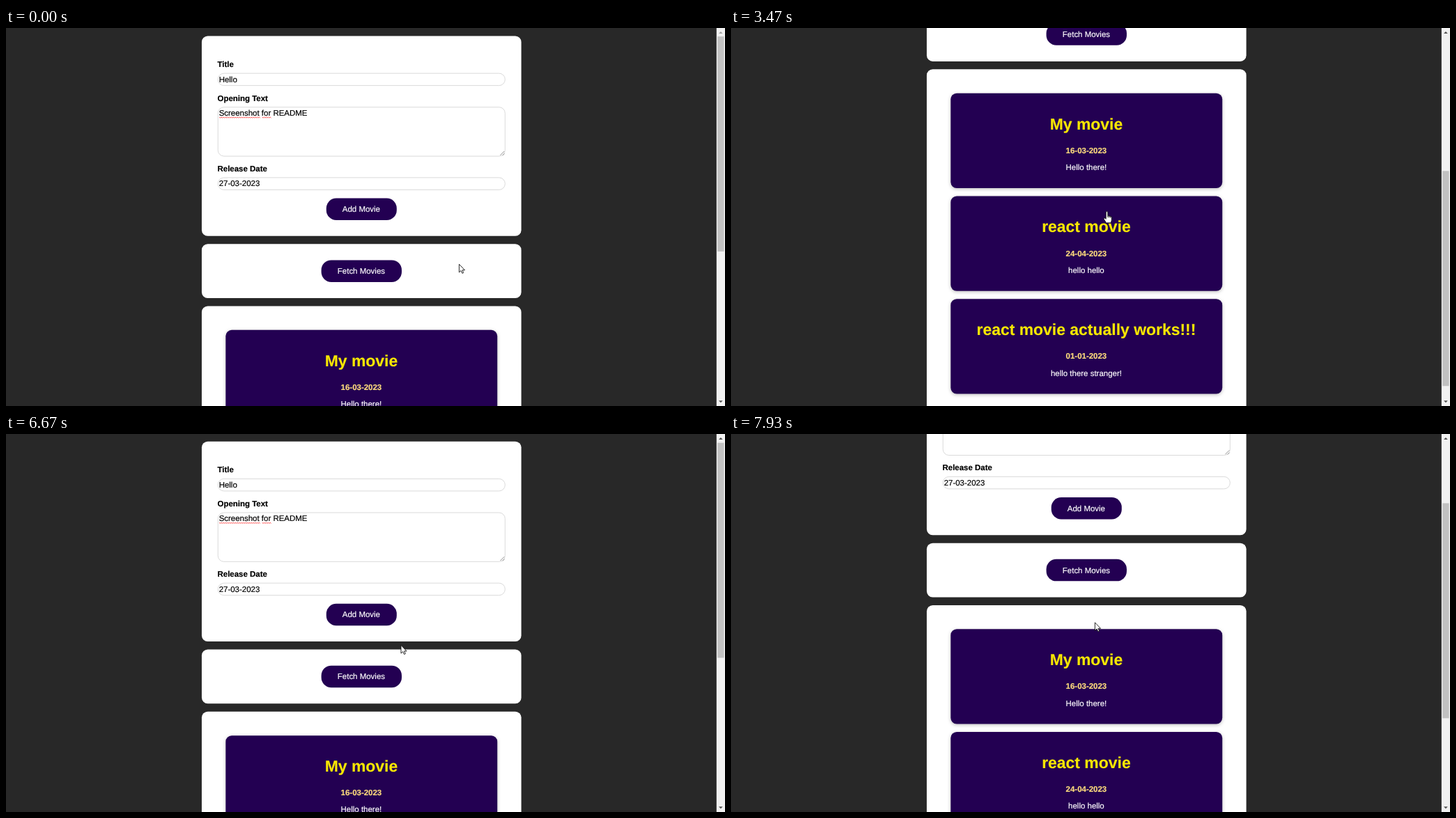
An HTML page that plays this animation: 1032x543 px, repeating every 8 s.

```html
<!DOCTYPE html>
<html lang="en">
<head>
<meta charset="utf-8">
<title>Movie form</title>
<style>
  html, body { margin: 0; width: 100%; height: 100%; overflow: hidden; background: #282828; }
  svg { display: block; width: 1032px; height: 543px; }
  text { font: 16px "Liberation Sans", Arial, sans-serif; text-rendering: geometricPrecision; stroke: #000; stroke-width: .25; }
  .bold { font-weight: bold; }
  .mid { text-anchor: middle; fill: #fff; stroke: #fff; }
  .mid.heading { font-size: 32px; font-weight: bold; fill: #f7e702; stroke: #f7e702; }
  .mid.date { font-weight: bold; fill: #fcdb7d; stroke: #fcdb7d; }
  .card { fill: #fff; }
  .field { fill: #fff; stroke: #ccc; }
  .button { fill: #230052; }
  .button.hover { fill: #460897; }
  .movie { fill: #230052; filter: drop-shadow(0 2px 4px rgba(0, 0, 0, .26)); }
  .line { fill: none; }
  .cursor { fill: #fff; stroke: #111; stroke-width: .9; stroke-linejoin: round; }
</style>
</head>
<body>
<svg viewBox="0 0 1032 543">
  <rect width="1032" height="543" fill="#282828"/>
  <g transform="scale(.71667)">
    <g id="page"></g>
    <rect x="1423" width="17" height="758" fill="#f1f1f1"/>
    <rect id="thumb" x="1425" width="13" height="431" fill="#c1c1c1"/>
    <path id="up" d="M1427.5 11L1431.5 7L1435.5 11Z"/>
    <path d="M1427.5 747L1431.5 751L1435.5 747Z" fill="#505050"/>
  </g>
  <g class="cursor" id="cursor">
    <path id="arrow" d="M.4 .5V12.2L3.1 9.7L4.9 13.6L6.7 12.8L5 9H8.5Z"/>
    <g id="hand">
      <path d="M-1.3 10V1.3A1.3 1.3 0 0 1 1.3 1.3V6L5.2 6.8Q6.8 7.2 6.8 9V12Q6.8 13.5 5.6 16.3H-1.2Q-2 13.8 -4 11.6Q-5 10 -4 9.4Q-2.8 9 -1.3 10.8Z"/>
      <path class="line" d="M1.3 6V8.6M3.2 6.5V8.8M5.1 6.9V9"/>
    </g>
  </g>
</svg>
<script>
const LOOP = 8000, FRAME = 1000 / 15, SCALE = .71667;
const CENTER = 712, LEFT = 424, GAP = 16;
const $ = id => document.getElementById(id);
const page = $('page');

function add(tag, attrs, content = '') {
  const el = document.createElementNS('http://www.w3.org/2000/svg', tag);
  for (const name in attrs) el.setAttribute(name, attrs[name]);
  el.textContent = content;
  return page.appendChild(el);
}
const write = (content, x, y, cls = '') => add('text', { x, y, class: cls }, content);
const centered = (content, y, cls = '') => write(content, CENTER - .5, y, `mid ${cls}`);
const box = (cls, y, width, height, rx = 12) =>
  add('rect', { class: cls, x: CENTER - width / 2, y, width, height, rx });
const card = (y, height) => box('card', y, 640, height);

function field(label, y, height, value) {
  write(label, LEFT - .5, y - 12, 'bold');
  box('field', y + .5, 575, height - 1);
  write(value, LEFT + 2.5, y + 17.8);
}

function button(label, y, width) {
  const rect = box('button', y, width, 44, 20);
  centered(label, y + 27.5);
  return rect;
}

function squiggle(x, y, width) {
  let d = `M${x} ${y}`;
  for (let i = 1; i * 2 <= width; i++) d += `L${x + i * 2} ${y + (i % 2) * 1.6}`;
  add('path', { class: 'line', d, stroke: '#f22', 'stroke-width': 1.1 });
}

function movie(y, title, date, text) {
  box('movie', y, 544, 190);
  centered(title, y + 72.3, 'heading');
  centered(date, y + 120, 'date');
  centered(text, y + 154);
}

card(GAP, 401);
field('Title', 90.4, 25.4, 'Hello');
field('Opening Text', 158.2, 99.2, 'Screenshot for README');
field('Release Date', 299.4, 25.4, '27-03-2023');
squiggle(427, 178.6, 82);
squiggle(513, 178.6, 19);
add('path', { class: 'line', d: 'M990 255L998 247M994.5 255.5L998.5 251.5', stroke: '#666' });
const addButton = button('Add Movie', 341.2, 141);
card(433, 108.4);
button('Fetch Movies', 465.2, 161);
card(557.4, 698.6);
[
  ['My movie', '16-03-2023', 'Hello there!'],
  ['react movie', '24-04-2023', 'hello hello'],
  ['react movie actually works!!!', '01-01-2023', 'hello there stranger!']
].forEach((details, i) => movie(605.4 + i * (190 + GAP + .2), ...details));

// A move eases from the current value to `to`; times are in steps of 1/15 s.
const BOTTOM = 368.6, NOTCH = 71.67;
const scrollMoves = [
  { from: 34.2, until: 40, to: [BOTTOM] },
  { from: 50.9, until: 55, to: [0] },
  { from: 99.65, until: 104, to: [5 * NOTCH] },
  { from: 105.7, until: 109, to: [BOTTOM] },
  { from: 112, until: 118, to: [BOTTOM - 3 * NOTCH] }
];
const cursorMoves = [
  { from: 1, until: 12, to: [539.5, 263.6] },
  { from: 80, until: 82.2, to: [568.5, 289.5] },
  { from: 92, until: 94, to: [566.6, 302.9] },
  { from: 115, until: 119, to: [522, 270.3] }
];

const clamp = p => Math.min(1, Math.max(0, p));
const easeInOut = (p, power) =>
  p < .5 ? (2 * p) ** power / 2 : 1 - (2 - 2 * p) ** power / 2;

function follow(initial, moves, step, power) {
  return moves.reduce((value, { from, until, to }) => {
    const p = easeInOut(clamp((step - from) / (until - from)), power);
    return value.map((v, i) => v + (to[i] - v) * p);
  }, initial);
}

function render(time) {
  const step = Math.floor((time % LOOP + 4) / FRAME);
  const scroll = follow([0], scrollMoves, step, 3)[0] / SCALE;
  const [x, y] = follow([650, 338.8], cursorMoves, step, 1.5);
  const hover = step >= 10 && step <= 81;
  page.setAttribute('transform', `translate(0 ${-scroll})`);
  $('thumb').setAttribute('y', 17 + scroll * .568);
  $('up').setAttribute('fill', scroll ? '#505050' : '#a3a3a3');
  $('cursor').setAttribute('transform', `translate(${x} ${y})`);
  $('hand').style.display = hover ? '' : 'none';
  $('arrow').style.display = hover ? 'none' : '';
  addButton.classList.toggle('hover', hover);
}

const start = performance.now();
(function tick() {
  render(performance.now() - start);
  requestAnimationFrame(tick);
})();
</script>
</body>
</html>
```
